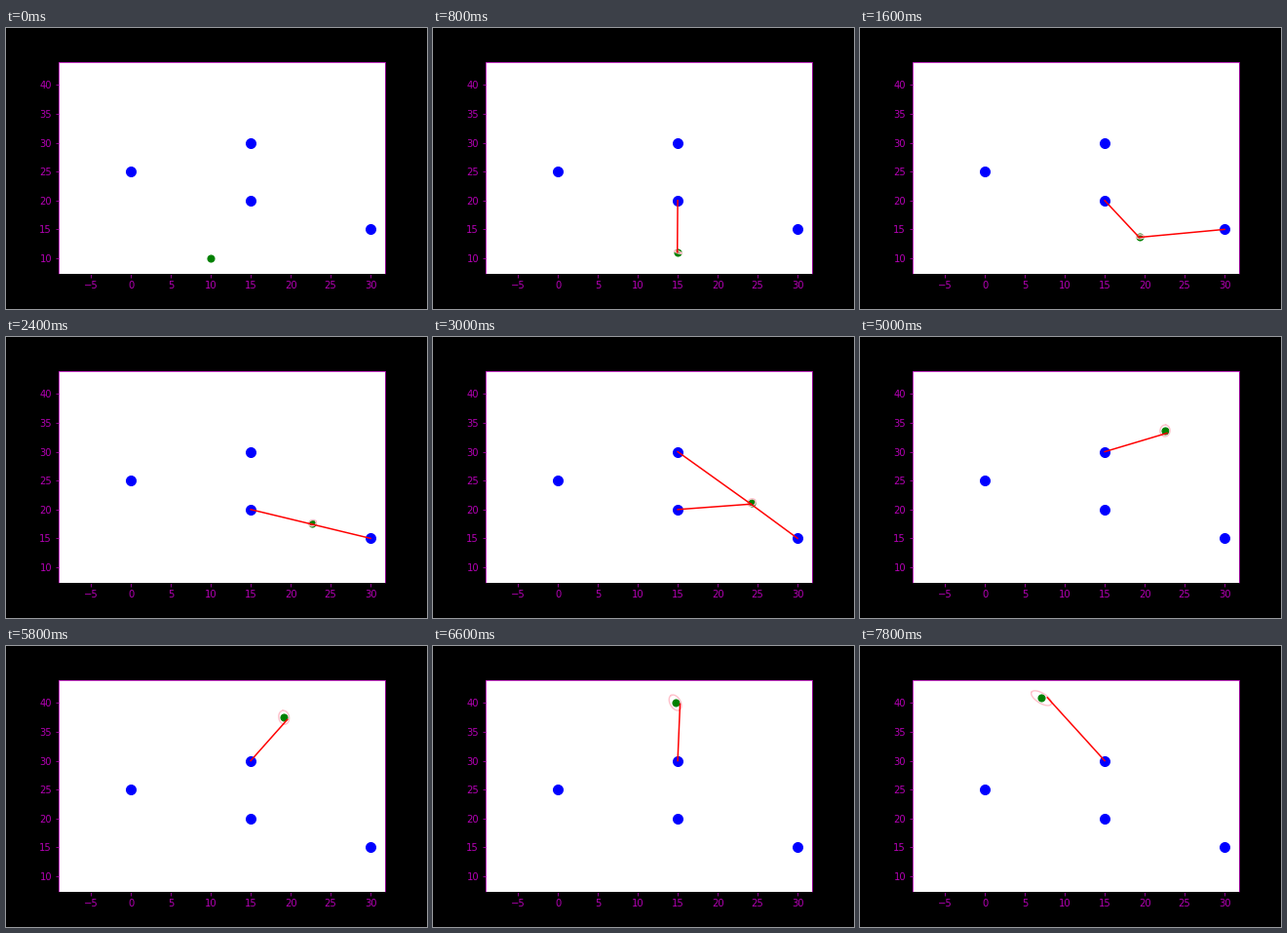
A matplotlib script that plays this animation: 432 by 288 pixels, repeating every 8 s.

```python
import numpy as np
import matplotlib.pyplot as plt
from matplotlib.animation import FuncAnimation

FRAMES, STEP_MS = 40, 200
PX = np.array([8.2, 5.92])            # pixels per data unit
MARKS = np.array([[0, 25], [15, 30], [15, 20], [30, 15]])
SENSOR_RANGE = 14.6
CENTER, RADIUS = np.array([9.35, 25.5]), 15.5
START_DEG, TURN_DEG = -87.6, 4.77     # position on the circle, turn per step
TINT = "#b400b4"


def bearing(k):
    return np.radians(START_DEG + TURN_DEG * k)


def robot(k):
    a = bearing(k)
    return CENTER + RADIUS * np.array([np.cos(a), np.sin(a)])


def ellipse(center, k):
    """Uncertainty outline: grows with time and turns with the heading."""
    p = k / (FRAMES - 1)
    major, minor = 3.8 + 8 * p**3, 5.4 * np.sin(1.9 * p)
    tilt = bearing(k) + np.radians(50)
    c, s = np.cos(tilt), np.sin(tilt)
    t = np.linspace(0, 2 * np.pi, 80)
    u, v = major * np.cos(t), minor * np.sin(t)
    return center[0] + (u * c - v * s) / PX[0], center[1] + (u * s + v * c) / PX[1]


fig = plt.figure(figsize=(6, 4), dpi=72, facecolor="black")
ax = fig.add_axes([0.125, 0.125, 0.775, 0.755])
ax.set_xlim(-9.03, 31.79)
ax.set_ylim(7.3, 44.02)
ax.tick_params(colors=TINT, labelsize=10)
for side in ("left", "top", "right"):
    ax.spines[side].set_color(TINT)

ax.scatter(*MARKS.T, s=100, color="blue", linewidths=1, zorder=1)
dot = ax.scatter([10], [10], s=50, color="green", linewidths=1, zorder=1.5)
ring, = ax.plot([], [], color="pink", lw=1.4, zorder=1.8)
beams = [ax.plot([], [], color="red", lw=1.5, zorder=2)[0] for _ in MARKS]


def draw(k):
    pos = robot(k)
    dot.set_offsets([pos])
    ring.set_data(*(ellipse(pos, k) if k else ([], [])))
    sensed = robot(k - 1)
    end = robot(0.985 * k)            # sightings drift behind the robot
    for mark, beam in zip(MARKS, beams):
        if k and np.hypot(*(mark - sensed)) < SENSOR_RANGE:
            beam.set_data([mark[0], end[0]], [mark[1], end[1]])
        else:
            beam.set_data([], [])
    return [dot, ring, *beams]


anim = FuncAnimation(fig, draw, frames=FRAMES, interval=STEP_MS,
                     repeat=True, repeat_delay=0, blit=False)
plt.show()
```
